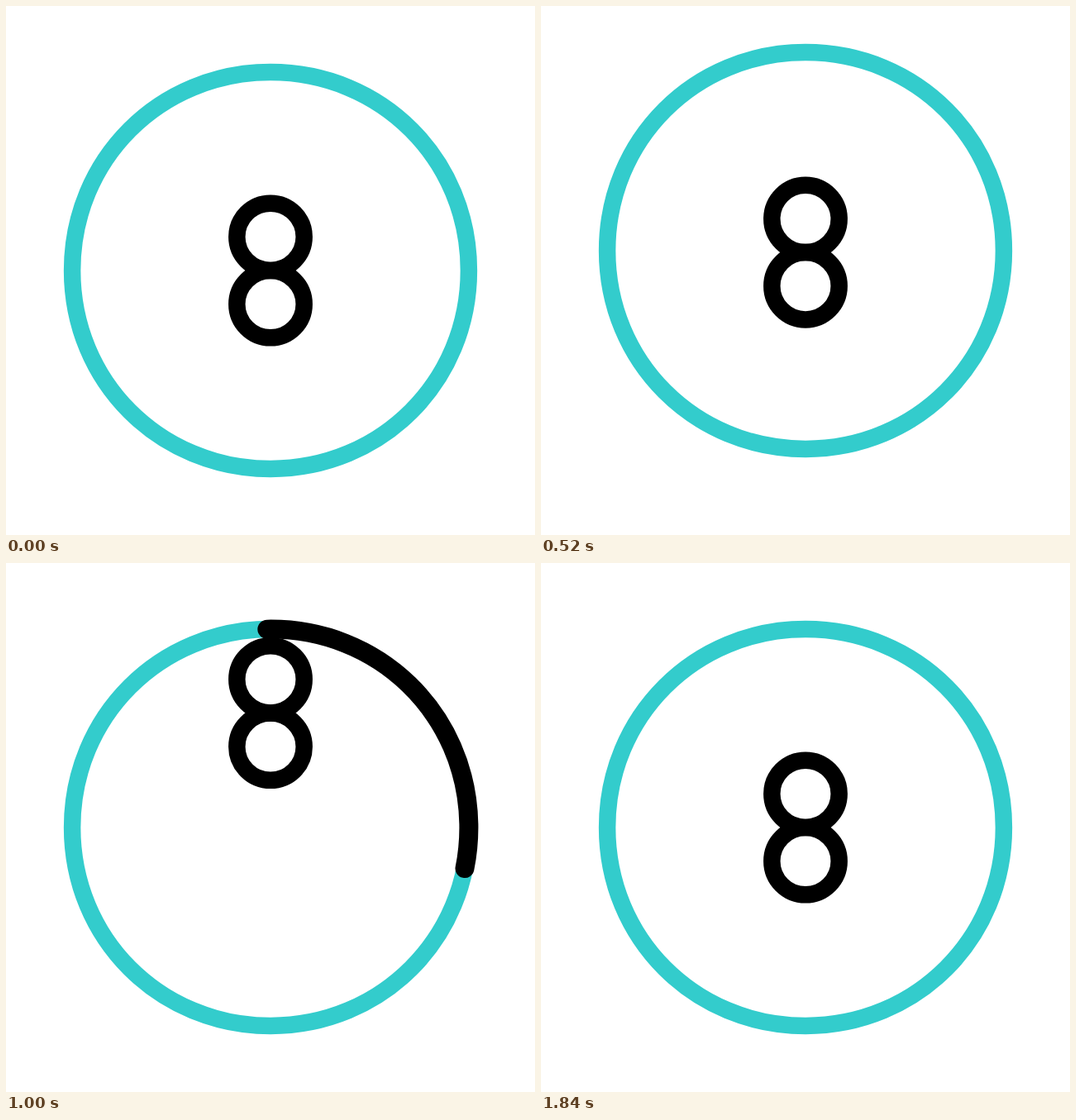
These frames come from a looping animation (640x640 px, 2000 ms). An HTML page:

```html
<!DOCTYPE html>
<html lang="en">
<head>
<meta charset="utf-8">
<title>Eight ball</title>
<style>
  html, body { margin: 0; height: 100%; overflow: hidden; background: #fff; }
  svg { display: block; width: 100%; height: 100%; fill: none; stroke: #000; stroke-width: 20.5; }
  #ring { stroke: #33cccc; }
  #arc { stroke-width: 23; stroke-linecap: round; }
</style>
</head>
<body>
<svg viewBox="0 0 640 640">
  <defs>
    <!-- Slightly fuller on the diagonals than a true circle -->
    <path id="outline" pathLength="1" d="M320 80.1C454.3 80.1 559.9 185.7 559.9 320S454.3 559.9 320 559.9 80.1 454.3 80.1 320 185.7 80.1 320 80.1Z"/>
  </defs>
  <use id="ring" href="#outline"/>
  <use id="arc" href="#outline" transform="rotate(-1 320 320)"/>
  <g id="eight">
    <circle cx="320" cy="279.33" r="40.67"/>
    <circle cx="320" cy="360.67" r="40.67"/>
  </g>
</svg>
<script>
const LOOP = 2000, STEP = 40;
const [ring, arc, eight] = ['ring', 'arc', 'eight'].map(id => document.getElementById(id));

// Keyframes are [time in ms, value]
const ringY = [[120, 0], [360, 33.33], [560, -30.67], [760, 0]];
const eightY = [[120, 0], [360, 53.33], [560, -30.67], [760, 38.9], [1000, -138.5], [1240, 0]];
const arcHead = [[760, 0], [1440, 1]];
const arcTail = [[1040, 0], [1840, 1]];

const smooth = u => u * u * (3 - 2 * u);

function valueAt(keys, t) {
  const next = keys.findIndex(([time]) => time > t);
  if (next === 0) return keys[0][1];
  if (next < 0) return keys[keys.length - 1][1];
  const [t0, v0] = keys[next - 1], [t1, v1] = keys[next];
  return v0 + (v1 - v0) * smooth((t - t0) / (t1 - t0));
}

const moveY = (el, y) => el.setAttribute('transform', `translate(0 ${y})`);

function draw(now) {
  const t = Math.floor((now % LOOP) / STEP) * STEP;
  moveY(ring, valueAt(ringY, t));
  moveY(eight, valueAt(eightY, t));

  const tail = valueAt(arcTail, t);
  const length = valueAt(arcHead, t) - tail;
  arc.style.display = length > 0 ? '' : 'none';
  arc.setAttribute('stroke-dasharray', `${length} 2`);
  arc.setAttribute('stroke-dashoffset', -tail);
}

function tick() {
  draw(performance.now());
  requestAnimationFrame(tick);
}
tick();
</script>
</body>
</html>
```
